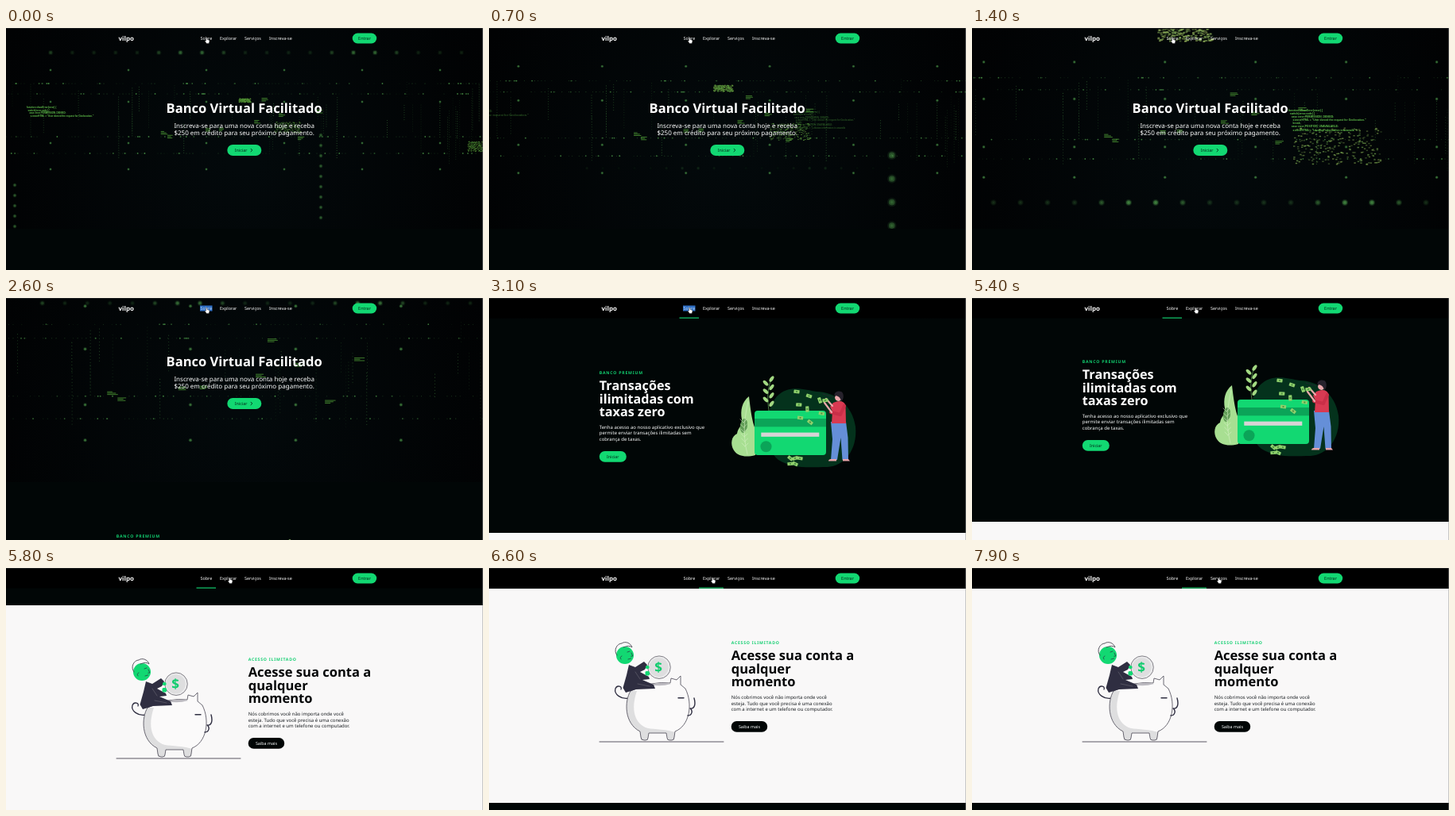
An HTML page with a canvas that plays this animation: 600 px wide and 305 px high, repeating every 8000 ms.

```html
<!DOCTYPE html>
<html lang="pt">
<head>
<meta charset="utf-8">
<title>Banco Virtual</title>
<style>
html, body { margin: 0; width: 600px; height: 305px; overflow: hidden; background: #010606; }
#stage { position: relative; width: 600px; height: 305px; overflow: hidden; background: #010606; }
canvas, svg { position: absolute; left: 0; top: 0; display: block; }
text { font-family: "Noto Sans", "Open Sans", sans-serif; text-rendering: geometricPrecision; white-space: pre; }
</style>
</head>
<body>
<div id="stage">
  <canvas id="video" width="600" height="253"></canvas>
  <svg id="view" width="600" height="305" viewBox="0 0 600 305"></svg>
</div>
<script>
const LOOP = 8000, STEP = 100;
const GREEN = '#12d872', DEEP = '#0ba458', INK = '#2f2e41', LIGHT = '#f9f8f8', NIGHT = '#010606';
const $ = id => document.getElementById(id);
const clamp = (v, a = 0, b = 1) => Math.min(b, Math.max(a, v));
const range = n => [...Array(n).keys()];
function seeded(seed) {
  return () => (seed = (seed * 16807) % 2147483647) / 2147483647;
}

// ---------- markup helpers ----------
const text = (x, y, size, str, fill = '#fff', more = '') =>
  `<text x="${x}" y="${y}" font-size="${size}" fill="${fill}" ${more}>${str}</text>`;
const lines = (x, y, size, gap, list, fill, more) =>
  list.map((s, i) => text(x, y + i * gap, size, s, fill, more)).join('');
const path = (d, fill, more = '') => `<path d="${d}" fill="${fill}" ${more}/>`;
const stroke = (d, color, w) =>
  path(d, 'none', `stroke="${color}" stroke-width="${w}" stroke-linecap="round" stroke-linejoin="round"`);
const rect = (x, y, w, h, fill, r = 0) => `<rect x="${x}" y="${y}" width="${w}" height="${h}" rx="${r}" fill="${fill}"/>`;
const disc = (x, y, r, fill, more = '') => `<circle cx="${x}" cy="${y}" r="${r}" fill="${fill}" ${more}/>`;
const oval = (x, y, rx, ry, turn, fill) =>
  `<ellipse rx="${rx}" ry="${ry}" fill="${fill}" transform="translate(${x} ${y}) rotate(${turn})"/>`;
const BOLD = 'font-weight="700"', MID = 'text-anchor="middle"';
const TOPLINE = BOLD + ' letter-spacing=".75"';

function hero() {
  return text(299.7, 107, 16.55, 'Banco Virtual Facilitado', '#fff', BOLD + ' ' + MID) +
    lines(299.7, 126.2, 8.03, 9.1, ['Inscreva-se para uma nova conta hoje e receba',
      '$250 em crédito para seu próximo pagamento.'], '#fff', MID) +
    rect(278.3, 147, 43, 14, GREEN, 7) + text(287.7, 156, 5.4, 'Iniciar', '#05281a') +
    stroke('M308 152.2l1.8 1.8l-1.8 1.8', '#05281a', .9);
}

function note(x, y, turn) {
  return `<g transform="translate(${x} ${y}) rotate(${turn})">` +
    rect(-3.6, -2.1, 7.2, 4.2, '#8fd06c', .5) + disc(0, 0, 1.1, '#4c8f43') + '</g>';
}

// notes drifting between the stack and the card, and a pile below
function notes() {
  const rnd = seeded(31);
  const air = range(8).map(i => note(387 + (i % 3) * 13 + rnd() * 6, 118 + i * 5.5, rnd() * 90));
  const pile = range(5).map(i => note(379 + (i % 3) * 6, 202 + (i % 2) * 7, 40 - i * 15));
  return air.concat(pile).join('');
}

function cardArt() {
  const leaf = i => oval(352 + (i % 2 ? -4 : 3.5), 102 + i * 5.2, 2.1, 4.2, i % 2 ? -45 : 35, '#a2d982');
  const veins = range(6).map(i => `M${320 + i * .4} ${157 + i * 6}l-4 -4m4 4l4 -4`).join('');
  return path('M362 124C378 108 398 116 412 118C434 118 457 134 461 162C464 192 446 212 426 213C402 213 384 216 364 204C346 190 344 146 362 124Z', '#04321c') +
    path('M327 124C318 131 316 142 318 153C320 160 313 163 312 171C305 174 303 184 308 192C313 200 324 201 335 198L338 172C332 160 330 150 327 124Z', '#a8df92') +
    oval(320.5, 161, 4.5, 9, 8, '#5f9c55') + stroke('M326 130C322 150 318 168 325 197' + veins, '#d3f0c3', .6) +
    stroke('M355 102C350 116 350 126 352 142', '#5f9c55', .8) + range(7).map(leaf).join('') +
    rect(334, 142, 90, 56, GREEN, 4) + rect(334, 152, 90, 10.3, DEEP) +
    rect(342.3, 169.6, 73, 5.2, '#d8d3d6') + disc(348.5, 187.2, 7, DEEP) + notes() +
    path('M430 156L449 156L451.5 176L452 204L444.5 204L442.5 176L438 204L430 204L432 178Z', '#658fd8') +
    path('M430 203h7v2.5h-10q0-2 3-2.5M445 203h7l2 2.5h-9z', '#e8a5ab') +
    path('M433 132C440 129 446 129 448.5 135L449 158L431 158L432 143L429 137Z', '#d83a52') +
    stroke('M447 136L442 147L430 144', '#c92f48', 4) +
    stroke('M432 136L424 127M431 144L422 132', '#eda8ac', 2.2) +
    note(423, 129, -8) + stroke('M420 121L433 125', '#25252f', .8) +
    disc(439.5, 125.5, 4.4, '#eda8ac') +
    path('M434.5 123C434 117 443 116 445 120C447 125 445 129 443 130C442 126 440 123 434.5 123Z', '#26222c');
}

function about() {
  return rect(0, 26, 600, 270, NIGHT) +
    text(138.8, 96, 5.2, 'BANCO PREMIUM', '#12cf70', TOPLINE) +
    lines(138.8, 116, 16.2, 16.6, ['Transações', 'ilimitadas com', 'taxas zero'], '#fff', BOLD) +
    lines(138.8, 164.8, 6, 7.6, ['Tenha acesso ao nosso aplicativo exclusivo que',
      'permite enviar transações ilimitadas sem', 'cobrança de taxas.'], '#fff') +
    rect(138.8, 193, 34, 13.7, GREEN, 6.8) + text(148, 201.8, 5.3, 'Iniciar', '#05281a') + cardArt();
}

function pigArt() {
  const body = 'M178 155C170 168 170 196 190 206L191 213Q191 217 195 217H197Q200 217 200 214L201 208H223L224 214Q224 217 227 217H230Q233 217 233 213L234 206C252 199 257 172 247 152L241 147L241 136L236 141L229 139L228 145Q205 142 178 155Z';
  return stroke('M139 219H295', '#5b5762', 1) +
    stroke('M176 164C166 166 157 159 159 152C161 147 168 149 166 153', INK, 1.3) +
    path(body, '#fbfafa') +
    path('M178 155C170 168 170 196 190 206L191 217H200L201 208H223L225 217H233L234 207C226 204 207 203 200 202C183 197 178 178 186 155Z', '#dededf') +
    stroke(body, '#4a4753', .8) +
    path('M203 147Q214 143 229 146Q216 150 203 147Z', '#bcbac0') +
    stroke('M238 163.8H245', INK, 1.4) +
    stroke('M258 164C260 171 259 178 253 177M253 177C257 180 255 186 250 186', INK, 1.4) +
    path('M176 122L184 125L195 118L199 122L196 128L190 131L201 137L202 140L193 141L207 147L209 152L185 153L172 157L168.5 151L173 135Z', INK) +
    stroke('M184 131L190 140M187 146L202 149', '#77747f', .5) +
    disc(214, 125.2, 14.3, '#ebebec', 'stroke="#66646d" stroke-width=".8"') +
    disc(213.5, 125.2, 12, '#dededf') +
    text(213.2, 131, 17, '$', '#12cc6e', BOLD + ' ' + MID) +
    rect(197, 123, 4.5, 4, GREEN, 1.5) + rect(196.5, 130, 5.5, 5.5, GREEN, 1.5) +
    disc(171, 110, 11, GREEN) +
    stroke('M161 110C156 104 161 95 167 95C171 92 178 94 180 100C176 97 172 99 169 100', '#4a4753', .9) +
    stroke('M174 106l3 -1M179 107l1.8 4l-2 .3M175 115l3.5 -1M167 111q-3 1 -1 4', INK, .7);
}

function explore() {
  return rect(0, 26, 600, 270, LIGHT) +
    text(304.7, 96, 5.2, 'ACESSO ILIMITADO', '#12cf70', TOPLINE) +
    lines(304.7, 116, 16.55, 16.6, ['Acesse sua conta a', 'qualquer', 'momento'], '#050708', BOLD) +
    lines(304.7, 164.9, 6, 7.6, ['Nós cobrimos você não importa onde você',
      'esteja. Tudo que você precisa é uma conexão', 'com a internet e um telefone ou computador.'], '#1c2024') +
    rect(304.7, 193, 45.5, 13.7, '#010606', 6.8) + text(313.9, 201.8, 5.4, 'Saiba mais') + pigArt() +
    rect(0, 296, 600, 60, NIGHT);
}

function nav() {
  const items = [[269, 'Explorar'], [300, 'Serviços'], [331, 'Inscreva-se']];
  return '<rect id="bar" width="600" height="25.5" fill="#000"/>' +
    rect(0, 0, 600, 1, '#1d1f20') + rect(599, 0, 1, 305, 'rgba(150,150,150,.5)') +
    text(141.6, 16.2, 7.95, 'vilpo', '#fff', BOLD) +
    '<rect id="mark" x="244" y="9.5" width="15.5" height="7" fill="#2f6fc4"/>' +
    text(244.4, 14.9, 5.45, 'Sobre', '#fff', 'id="first"') +
    items.map(i => text(i[0], 14.9, 5.45, i[1])).join('') +
    '<rect id="line" y="24.5" height="1.2" fill="#12c96c"/>' +
    rect(435.7, 6.5, 30.5, 13, GREEN, 6.5) + text(451, 14.9, 5.45, 'Entrar', '#05281a', MID) +
    '<g id="hand">' + path('M-1.3 -3.2Q-.8 -3.8 -.2 -3.2L.1 -1L2.5 -.3Q3.2 .2 2.9 1.5L2.2 3.8H-.8L-2.8 .8Q-2.8 0 -1.5 .5Z', '#fff', 'stroke="#111" stroke-width=".4"') + '</g>';
}

$('view').innerHTML = `<g id="page">${hero()}<g transform="translate(0 227)">${about()}</g>` +
  `<g transform="translate(0 497)">${explore()}</g></g>${nav()}`;

// ---------- hero video: a flight through a lattice of lights ----------
// Offsets are measured from the vanishing point; t is in seconds.
const ctx = $('video').getContext('2d');
const CX = 309, CY = 115;
const zoomAt = (depth, t) => t < depth - .05 ? depth / (depth - t) : 0;

function dot(x, y, r, a) {
  ctx.fillStyle = `rgba(88,176,84,${a})`;
  ctx.beginPath();
  ctx.arc(CX + x, CY + y, r, 0, 7);
  ctx.fill();
}
function glow(x, y, r, a) {
  dot(x, y, r * 1.5, a * .25);
  dot(x, y, r, a * .75);
  dot(x, y, r * .5, a * .5);
}

function lattice(t) {
  const z = zoomAt(10, t), rnd = seeded(71);
  for (let i = 0; i < 44; i++) {
    const x = (rnd() - .5) * 620, top = -48 + rnd() * 55, len = 15 + rnd() * 55, a = .1 + rnd() * .35;
    for (let y = top; y < top + len; y += 3) dot(x * z, y * z, .55, a);
  }
  for (const y of [-45, -32, 22, 43]) {
    for (let x = -310; x < 310; x += 4) if (rnd() < .5) dot(x * z, y * z, .55, .1 + rnd() * .35);
    for (let i = 0; i < 26; i++) dot((rnd() - .5) * 620 * z, y * z, .9, .3 + rnd() * .4);
  }
  for (const y of [-62, -22, 30, 63]) {
    for (let i = -3; i <= 2; i++) glow((41 + 98 * i) * z, y * z, 1.2 * z, .6);
  }
}

// a wide row of lamps sweeping past above or below
function rail(side, arrival, t) {
  const gap = arrival - t;
  if (gap < .3) return;
  const near = clamp(1.9 - gap);
  for (let i = -9; i <= 10; i++) {
    const a = .2 + .55 * Math.max(0, Math.cos((i + 2.5) * Math.PI / 4));
    glow((34 * i - 10) / gap, side * 105 / gap, 2.8 / gap, a * near);
  }
}

function pillar(x, top, t) {
  const z = zoomAt(1.25, t);
  for (let y = top; z && y < 137; y += 13) glow(x * z, y * z, 1.7 * z, .45);
}

// a glowing block of distant text that breaks into specks up close
function panel([x, y, w, h, depth], t) {
  const z = zoomAt(depth, t), rnd = seeded(19);
  if (!z || z > 9) return;
  for (let i = 0; i < 260; i++) {
    const px = (x + (rnd() - .5) * w) * z, py = (y + (rnd() - .5) * h) * z;
    ctx.fillStyle = `rgba(${60 + rnd() * 30 + 18 * z},${150 + 10 * z},${50 + 11 * z},${.25 + rnd() * .4})`;
    ctx.fillRect(CX + px, CY + py, 1.3 * Math.sqrt(z), .8 * Math.sqrt(z));
  }
}

function tags(t) {
  const z = zoomAt(7, t), rnd = seeded(409);
  for (let i = 0; i < 9; i++) {
    const x = (rnd() - .5) * 230 * z, y = (rnd() - .6) * 75 * z;
    ctx.fillStyle = 'rgba(84,168,58,.7)';
    for (let k = 0; k < 3; k++) ctx.fillRect(CX + x, CY + y + k * 1.7, (4 + rnd() * 5) * z, 1);
  }
}

const CODE = ['function showError(error) {', '  switch(error.code) {', '    case error.PERMISSION_DENIED:',
  '      x.innerHTML = "User denied the request for Geolocation."', '      break;',
  '    case error.POSITION_UNAVAILABLE:', '      x.innerHTML = "Location information is unavaila'];

function code(x, y, size, count, at, t) {
  ctx.save();
  ctx.globalAlpha = clamp(1.8 - Math.abs(t - at) * 2);
  ctx.translate(CX, CY);
  ctx.scale(zoomAt(3, t - at), zoomAt(3, t - at));
  ctx.font = `bold ${size}px "Liberation Sans", Arial, sans-serif`;
  ctx.fillStyle = '#62c34c';
  CODE.slice(0, count).forEach((row, i) => ctx.fillText(row, x, y + i * size * 1.22));
  ctx.restore();
}

function drawVideo(t) {
  const haze = ctx.createRadialGradient(300, 160, 20, 300, 160, 330);
  haze.addColorStop(0, '#03090b');
  haze.addColorStop(1, '#010203');
  ctx.fillStyle = haze;
  ctx.fillRect(0, 0, 600, 253);
  lattice(t);
  tags(t);
  rail(-1, 1.25, t);
  rail(1, 2.4, t);
  rail(-1, 3.8, t);
  pillar(87, 20, t);
  pillar(-298, 83, t);
  [[-9, -24, 15, 5, 1.79], [45, 10, 33, 14, 2], [281, 34, 19, 13, 1.5]].forEach(p => panel(p, t));
  code(-283, -14, 2.9, 4, 0, t);
  code(89, -10, 3.35, 7, 1.4, t);
}

// ---------- timeline ----------
const ease = x => (x = clamp(x)) < .5 ? 2 * x * x : 1 - 2 * (1 - x) ** 2;
const move = (t, from, span, by) => by * ease((t - from) / span);
const GLIDE = 623;
const scrollAt = t => Math.round(move(t, 2466, GLIDE, 227) + move(t, 5300, GLIDE, 270));
const pointerAt = t => 253 + move(t, 3400, 600, 31) - move(t, 4500, 400, 2) + move(t, 6800, 700, 29);
const show = (id, on) => $(id).setAttribute('visibility', on ? 'visible' : 'hidden');

function render(t) {
  const y = scrollAt(t), picked = t >= 2400 && t < 5200, last = y >= 497;
  $('page').setAttribute('transform', `translate(0 ${-y})`);
  $('video').style.transform = `translateY(${-y}px)`;
  if (y < 253) drawVideo(t / 1000);
  show('bar', y >= 80);
  show('mark', picked);
  $('first').setAttribute('fill', picked ? '#b9d4f3' : '#fff');
  show('line', y >= 227);
  $('line').setAttribute('x', last ? 264 : 239.5);
  $('line').setAttribute('width', last ? 31 : 24.5);
  $('hand').setAttribute('transform', `translate(${pointerAt(t)} 15.6)`);
}

const start = performance.now();
let shown = -1;
function tick() {
  const t = Math.floor(((performance.now() - start) % LOOP) / STEP) * STEP;
  if (t !== shown) render(shown = t);
  requestAnimationFrame(tick);
}
tick();
</script>
</body>
</html>
```
